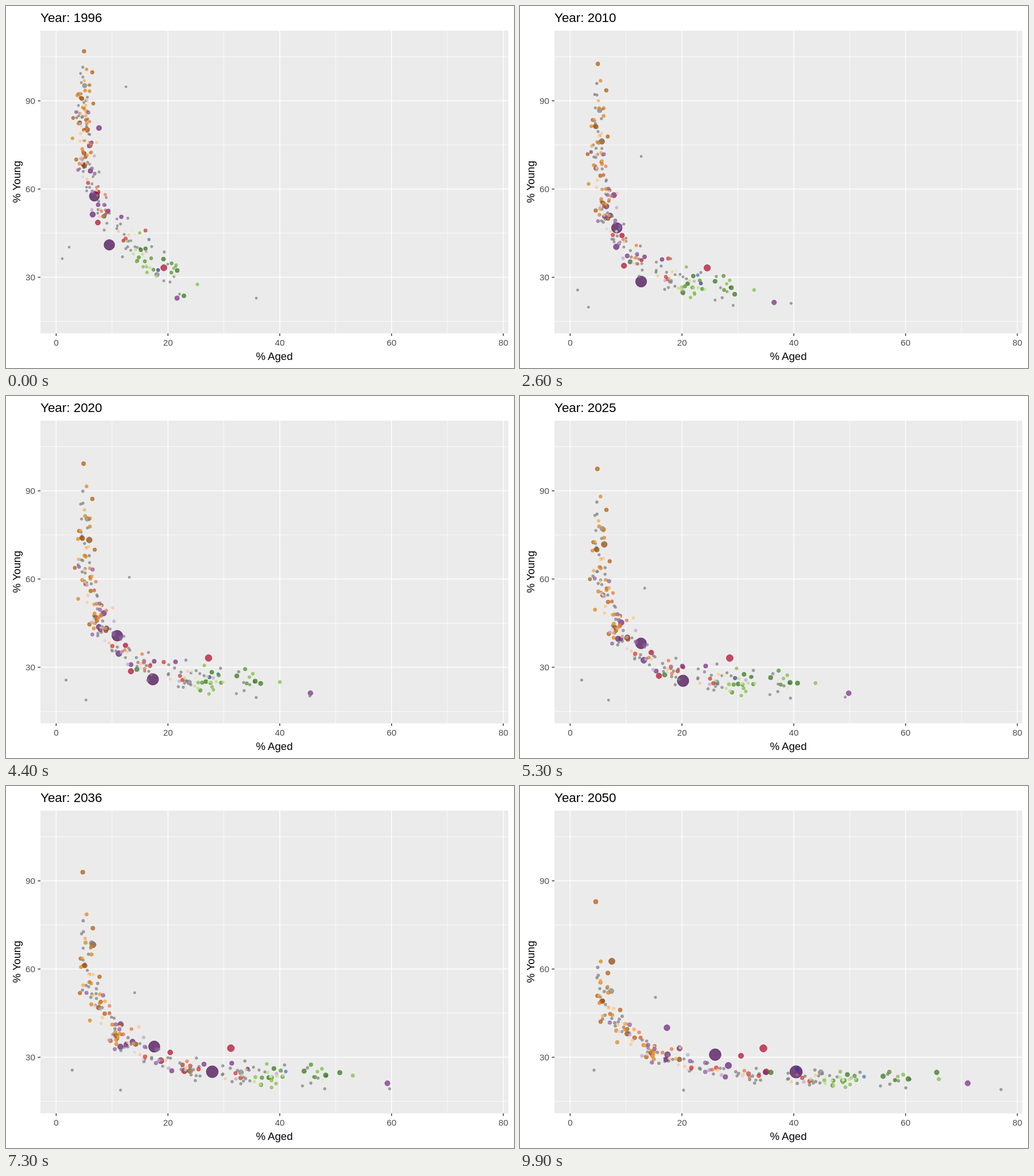
Recreate the animation shown at these times as an HTML page. Size 885 by 632 pixels, loop 10 s.

```html
<!DOCTYPE html>
<html lang="en">
<head>
<meta charset="utf-8">
<title>Young and aged population</title>
<style>
  html, body { margin: 0; width: 100%; height: 100%; overflow: hidden; background: #fff; }
  svg { display: block; width: 885px; height: 632px; }
  text { font-family: "Liberation Sans", Arial, sans-serif; }
</style>
</head>
<body>
<svg id="stage" viewBox="0 0 885 632"></svg>
<script>
const stage = document.getElementById('stage');
const STEP = 100, STEPS = 100;

function add(tag, attrs, text = '') {
  const node = document.createElementNS('http://www.w3.org/2000/svg', tag);
  for (const name in attrs) node.setAttribute(name, attrs[name]);
  node.textContent = text;
  stage.append(node);
  return node;
}

const line = (x1, y1, x2, y2, stroke, width) =>
  add('line', { x1, y1, x2, y2, stroke, 'stroke-width': width });
const label = (x, y, size, text, anchor, fill = '#000', extra = {}) =>
  add('text', { x, y, 'font-size': size, 'text-anchor': anchor, fill, ...extra }, text);

// Chart frame
const LEFT = 60, RIGHT = 875, TOP = 43, BOTTOM = 571.5;
const px = v => 87.4 + v * 9.738;
const py = v => 627.6 - v * 5.134;
const column = (v, width) => line(px(v), TOP, px(v), BOTTOM, '#fff', width);
const row = (v, width) => line(LEFT, py(v), RIGHT, py(v), '#fff', width);

add('rect', { width: 885, height: 632, fill: '#fff' });
add('rect', { x: LEFT, y: TOP, width: RIGHT - LEFT, height: BOTTOM - TOP, fill: '#ebebeb' });
for (let v = 10; v < 80; v += 20) column(v, 0.75);
for (let v = 15; v < 110; v += 30) row(v, 0.75);
for (let v = 0; v <= 80; v += 20) {
  column(v, 1.45);
  line(px(v), BOTTOM, px(v), BOTTOM + 4.5, '#333', 1.45);
  label(px(v), 592.5, 15.2, v, 'middle', '#4d4d4d');
}
for (let v = 30; v <= 90; v += 30) {
  row(v, 1.45);
  line(LEFT - 4.5, py(v), LEFT, py(v), '#333', 1.45);
  label(51, py(v) + 5.6, 15.2, v, 'end', '#4d4d4d');
}
label(467.5, 618, 18.6, '% Aged', 'middle');
label(0, 0, 18.6, '% Young', 'middle', '#000', { transform: 'translate(25 307) rotate(-90)' });
const title = label(LEFT, 28, 22.4, '', 'start');

// Motion helpers: progress p runs from 0 to 1
const mix = (a, b, p) => a + (b - a) * p;
const easeOut = (p, power) => 1 - (1 - p) ** power;

let seed = 1996;
function random() {
  seed = (seed + 0x6d2b79f5) | 0;
  let h = Math.imul(seed ^ (seed >>> 15), 1 | seed);
  h = (h + Math.imul(h ^ (h >>> 7), 61 | h)) ^ h;
  return ((h ^ (h >>> 14)) >>> 0) / 4294967296;
}
const spread = () => random() + random() + random() - 1.5;

const dots = [];
function dot(fill, radius, place) {
  const node = add('circle', {
    fill, stroke: fill, 'fill-opacity': 0.7, 'stroke-opacity': 0.7, 'stroke-width': 0.8
  });
  dots.push({ node, radius, place });
}

// Ageing speeds up over time, while the share of young people levels off.
function track(fill, radius, from, to, decline = 2, ageing = 1.9) {
  dot(fill, radius, p => [
    mix(from[0], to[0], p ** ageing),
    mix(from[1], to[1], easeOut(p, decline))
  ]);
}

const VIOLET = '#40004b', PURPLE = '#5e1a6e', PLUM = '#762a83', LILAC = '#8d5aa5';
const BROWN = '#8a4306', RUST = '#b35806', ORANGE = '#e08214', GRAY = '#7f7f7f';
const CRIMSON = '#b00526', RED = '#d6302a', GREEN = '#2f7416', LEAF = '#4d9221';

// Large populations
track(VIOLET, 9.7, [180, 417], [481, 499], 5, 1.7);
track(VIOLET, 9.2, [154, 332], [340, 469], 1.7);
track(CRIMSON, 5.7, [275, 457], [424, 458], 1, 0.8);
track(PURPLE, 5, [151, 364], [363, 488]);
track(CRIMSON, 4.7, [160, 378], [429, 499], 3.2);
track(PLUM, 4.2, [298, 510], [780, 519], 6, 0.9);
track('#6a2078', 4.7, [162, 213], [256, 422], 2.7, 3);
track(PURPLE, 4.6, [146, 243], [257, 469], 2.1, 2.4);
track(PURPLE, 4.2, [147, 288], [278, 458]);
track(CRIMSON, 4.1, [160, 325], [385, 471], 2.4);
track(BROWN, 4.9, [141, 216], [160, 306], 0.85);
track(RUST, 3.5, [136, 79], [132, 202], 0.65);
track(GRAY, 4.1, [137, 139], [159, 358], 0.72);
track(GRAY, 4.2, [263, 469], [524, 500], 15);
track(GREEN, 3.8, [171, 367], [437, 500], 3);
track(GREEN, 3.7, [310, 506], [726, 500], 2, 1.4);
track(RED, 3.2, [243, 392], [342, 492], 2.2, 1.4);
track('#2c3a96', 3, [265, 461], [483, 494], 4, 1.1);

// Outlying small populations
track(GRAY, 2.1, [98, 441], [129, 496], 20);
track(GRAY, 2, [110, 421], [285, 531], 10, 2.2);
track(GRAY, 2, [209, 141], [236, 369], 2.5);
track(GRAY, 2.1, [436, 510], [838, 530], 2, 1.8);

// The cloud bends from a steep column into a long tail; rank 0 is the youngest end.
function cloudPoint(rank, p) {
  const width = mix(180, 550, p ** 1.25);
  const bend = mix(2.1, 4.7, (1 - p) ** 1.6);
  const drop = mix(0.85, 2.6, easeOut(p, 1.6));
  return [
    135 + width * rank ** bend,
    mix(mix(100, 290, p * p), mix(495, 514, p), easeOut(rank, drop))
  ];
}

function family(fill, radius, count, from, to) {
  for (let i = 0; i < count; i++) {
    const rank = mix(from, to, (i + random()) / count);
    const sx = spread(), sy = spread();
    dot(fill, radius * mix(0.95, 1.08, random()), p => {
      const [x, y] = cloudPoint(rank, p);
      return [
        Math.max(112, x + sx * (15 + 0.12 * (x - 130))),
        y + sy * mix(26, 14, p ** 3)
      ];
    });
  }
}

family(GRAY, 2.2, 32, 0.06, 0.5);
family(GRAY, 2.2, 52, 0.5, 0.98);
family(PLUM, 3.7, 4, 0.5, 0.85);
family(BROWN, 3.7, 4, 0.12, 0.6);
family(RUST, 3.1, 10, 0.06, 0.5);
family(ORANGE, 2.8, 14, 0.02, 0.5);
family('#f5a34a', 2.5, 11, 0.08, 0.55);
family('#fdc586', 2.3, 11, 0.2, 0.85);
family('#fee0b6', 2, 5, 0.15, 0.6);
family(LILAC, 3, 9, 0.25, 0.7);
family('#c2a5cf', 2.5, 7, 0.3, 0.9);
family('#e0cde4', 2.2, 5, 0.3, 0.75);
family('#f0703f', 2.6, 8, 0.3, 0.8);
family(RED, 3, 4, 0.55, 0.9);
family('#3c78b8', 2.4, 1, 0.84, 0.86);
family(GREEN, 3.6, 4, 0.86, 0.96);
family(LEAF, 3, 7, 0.86, 0.99);
family('#7fbc41', 2.6, 8, 0.85, 1);
family('#b8e186', 2.3, 7, 0.8, 1);
family('#dcecc0', 2.1, 4, 0.75, 0.98);

function draw(ms) {
  const p = Math.floor(ms / STEP) % STEPS / (STEPS - 1);
  title.textContent = 'Year: ' + Math.round(mix(1996, 2050, p));
  for (const { node, radius, place } of dots) {
    const [x, y] = place(p);
    node.setAttribute('cx', x.toFixed(2));
    node.setAttribute('cy', y.toFixed(2));
    node.setAttribute('r', (radius * mix(0.96, 1.12, p)).toFixed(2));
  }
}

let start;
function tick(now) {
  start ??= now;
  draw(now - start);
  requestAnimationFrame(tick);
}
draw(0);
requestAnimationFrame(tick);
</script>
</body>
</html>
```
